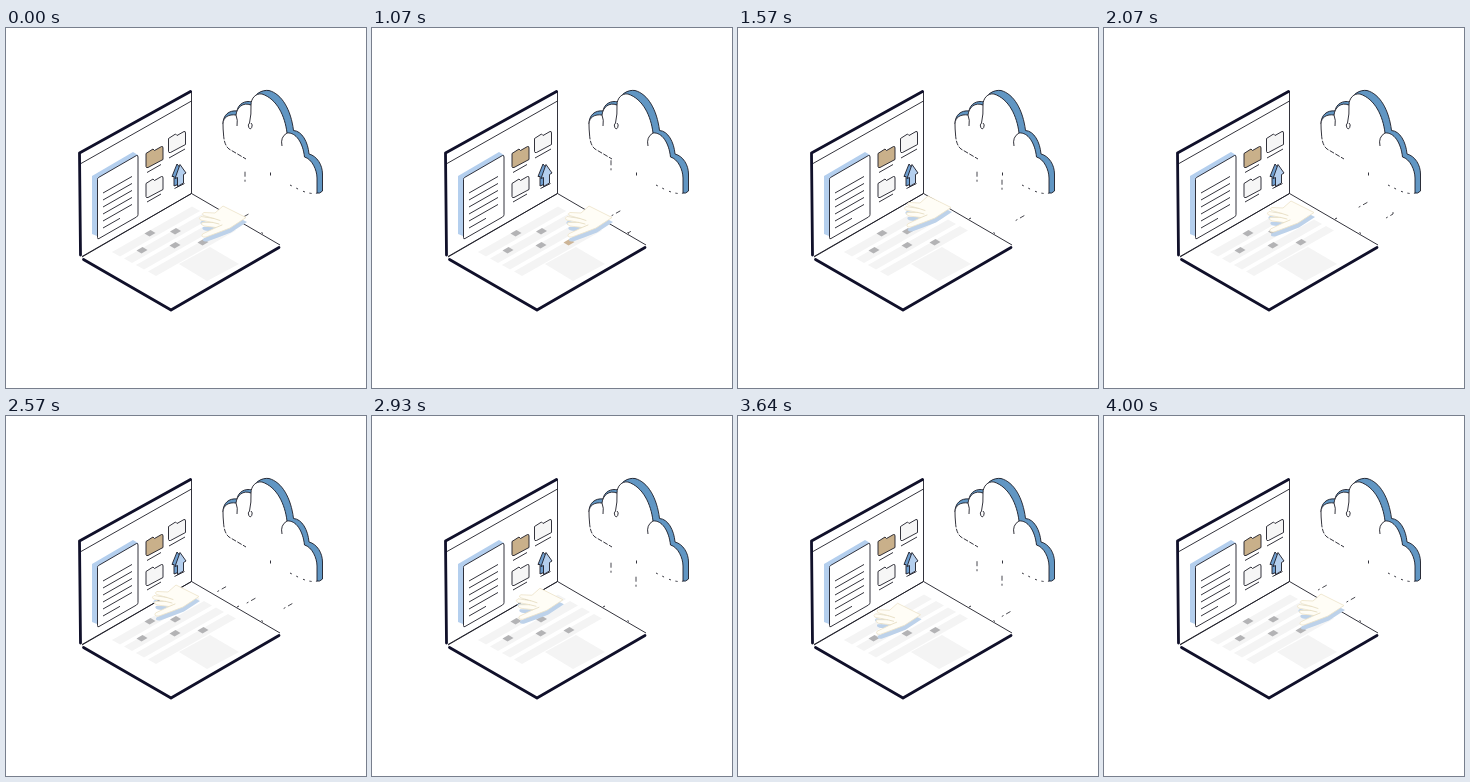
Recreate the animation shown at these times as an HTML page. Size 360x360 px, loop 4280 ms.

```html
<!DOCTYPE html>
<html lang="en">
<head>
<meta charset="utf-8">
<title>Laptop to cloud</title>
<style>
  html, body { margin: 0; width: 100%; height: 100%; overflow: hidden; background: #fff; }
  svg { display: block; width: 100vw; height: 100vh; }
  .line { fill: none; stroke: #1c1c26; stroke-width: .9; stroke-linejoin: round; }
  .edge { fill: none; stroke: #10102a; stroke-width: 2.8; stroke-linejoin: round; stroke-linecap: round; }
  .side { fill: #6196c3; }
  .pale { fill: #f4f4f4; }
  .key { fill: #b3b3b5; }
  .key.down { fill: #cdb597; }
  .packet { fill: none; stroke: #33333a; stroke-width: .9; stroke-dasharray: 2 3 5 70; }
  .skin { fill: #fffdf6; stroke: #ece3c8; stroke-width: .8; stroke-linejoin: round; }
  .crease { fill: none; stroke: #e4dabd; stroke-width: .8; stroke-linecap: round; }
</style>
</head>
<body>
<svg viewBox="0 0 360 360">
  <defs>
    <path id="palm" d="M217 178 L240 189.500 L224 200 L211 205 L200 209 Q194.500 209.500 196.500 206 L210 199.500 L198 198 Q194 196.500 196 194.500 L207 194.500 L194.500 192 Q192 190 195 188.500 L208 190.500 L197.500 187.500 Q195 185.500 198 184.500 L209 185 Z"/>
    <path id="folder" d="M0 6 L7 1.500 L8.500 3 L15.500 -1 Q17 -1.500 17 .5 V12 L2 20 Q0 20.500 0 19 Z"/>
  </defs>

  <!-- screen -->
  <path class="line" d="M75 135.500 L185.500 73 M185.500 63 V165.500 L76 228.500"/>
  <path class="edge" d="M74.500 227 L73.500 125 L184.500 63.500"/>

  <!-- document -->
  <path fill="#b4cfee" d="M86 148 L127 124 L132 127 V182 L91 208 L86 206 Z"/>
  <path class="line" style="fill:#fff" d="M92.500 149.500 L130.500 127.500 Q132 127 132 129 V186.500 Q132 188 130.500 189 L93 210.500 Q91.500 211.500 91.500 209.500 V151.500 Q91.500 150 92.500 149.500 Z"/>
  <path id="text" class="line"/>

  <!-- icons -->
  <g class="line">
    <use href="#folder" x="140" y="119.500" fill="#c9b08a"/>
    <use href="#folder" x="162.500" y="104.500" fill="#f6f6f6"/>
    <use href="#folder" x="140" y="149.500" fill="#f6f6f6"/>
    <path d="M141 144.500 L155 136.500 M163 130 L179 121 M141 174 L155 166 M168.500 160.500 L178.500 155.500"/>
    <path d="M166 148.500 L171 136 L176 142 L173 144 V156 L168 158 V148.500 Z" fill="#6f9fd0"/>
    <path d="M169 150.500 L174 136.500 L180 145 L177.500 146.500 V155 L171.500 158.500 V149.500 Z" fill="#b4cfee"/>
  </g>

  <!-- base -->
  <path class="line" d="M76 229 L185.500 165.500 L274 217"/>
  <path class="edge" d="M77.500 231.500 L165 282 L273 219.500"/>
  <g id="keyboard"></g>
  <path class="pale" d="M173 236 L204 219 L233 236 L201 253 Z"/>

  <!-- cloud -->
  <path class="line side" d="M217 96 C217 87 223 82 231 83 C232 76 239 72 246 74 C248 66 256 61.500 263 62.500 C276 66 285 82 287.500 102.500 C296 103 302 114 303 126 C311 128 316.500 137 316.500 146 V163 Q314 166 310 165 Z"/>
  <path fill="#fff" d="M217 96 C217 89 223 86 230 87 C231 79 237 74 245 77 C245 70 250 65 256 66 C271 71 279 88 281 105 C290 104 297 115 298.500 129 C306 131 311 142 311 150 V165 Q307 167 300 165 L264 146 L239 131 L222 121 Q217 114 217 96 Z"/>
  <path class="line" d="M217.500 106 Q217 101 217 96 C217 89 223 86 230 87 C231 79 237 74 245 77 C245 70 250 65 256 66 C271 71 279 88 281 105 C290 104 297 115 298.500 129 C306 131 311 142 311 150 V165"/>
  <path class="line" d="M230 87 Q232 92 231 98 M245 77 Q245.500 86 243.500 95 M243.500 95 a1.800 3 0 1 0 1.500 0 M281 105 Q274 109 276 118"/>
  <path class="line" stroke-dasharray="5 1.500" d="M217.500 106 Q218 117 223 121 L240 131"/>
  <path class="line" stroke-dasharray="2 5" d="M284 157 L292 161 Q304 167 311 165"/>
  <path class="line" d="M264.500 144.500 v3 M255.500 204.500 l1.500 1 M231 191 l2 -1"/>

  <g id="packets"></g>

  <!-- hand -->
  <use id="shade" href="#palm" fill="#bdd2ea"/>
  <g id="hand">
    <use href="#palm" class="skin"/>
    <path class="crease" d="M207 194.500 L213 196 M208 190.500 L214 192.500 M210 199.500 L216 197"/>
  </g>
</svg>

<script>
const LOOP = 4280, START = 1070, STEP = 2930 / 41;
const $ = id => document.getElementById(id);
const add = (parent, attrs) => {
  const el = document.createElementNS("http://www.w3.org/2000/svg", "path");
  for (const name in attrs) el.setAttribute(name, attrs[name]);
  return parent.appendChild(el);
};

// Text lines on the document; the last is short.
let lines = "";
for (let i = 0; i < 6; i++) {
  const w = i === 5 ? 17 : 29;
  lines += `M97 ${165 + i * 7} l${w} ${-w * .57} `;
}
$("text").setAttribute("d", lines);

// Keyboard rows follow the isometric slope.
for (let i = 0; i < 4; i++) {
  const x = 106 + i * 12, y = 226 + i * 6.5;
  add($("keyboard"), { class: "pale", d: `M${x} ${y - 2} l80 -45.600 l8 4.500 l-80 45.600 Z` });
}

// x, y, first and last step of being pressed
const keys = [[197, 214, 1, 2], [169.5, 203, 11, 12], [144, 205, 23, 24], [136, 222, 33, 34], [169, 217, -1, -1]]
  .map(([x, y, from, to]) => ({
    from, to,
    el: add($("keyboard"), { class: "key", d: `M${x - 5.5} ${y + .5} l6 -3.500 l5 3 l-6 3.500 Z` })
  }));

// Distance travelled by each packet at the marked steps
const marks = [0, 7, 14, 21, 31, 41];
const packets = [
  ["M207 178 L239 160 V131", [43, 123, 230, 325, 395, 488]],
  ["M232 192 L264 174 V146", [2, 49, 106, 170, 230, 332]],
  ["M256 205 L289 186 V160", [68, 105, 190, 265, 348, 470]]
].map(([d, travel]) => ({ travel, el: add($("packets"), { class: "packet", d }) }));

// step, x, y of the hand
const poses = [[0, 0, 0], [2, 0, 0], [7, -27, -10], [10, -30, -5], [14, -30, -5],
  [21, -47, -9], [25, -48, -7], [31, -62, 10], [35, -62, 10], [41, 0, 0]];

const mix = (a, b, p) => a + (b - a) * p;
const segment = (list, k) => {
  let i = 0;
  while (i < list.length - 2 && k >= list[i + 1]) i++;
  return [i, (k - list[i]) / (list[i + 1] - list[i])];
};

function draw(k) {
  const [i, raw] = segment(poses.map(p => p[0]), k);
  const p = raw * raw * (3 - 2 * raw);
  const x = mix(poses[i][1], poses[i + 1][1], p);
  const y = mix(poses[i][2], poses[i + 1][2], p);
  $("hand").setAttribute("transform", `translate(${x} ${y})`);
  $("shade").setAttribute("transform", `translate(${x + 1} ${y + 4.5})`);

  for (const key of keys)
    key.el.classList.toggle("down", k >= key.from && k <= key.to);

  const [j, q] = segment(marks, k);
  for (const { el, travel } of packets)
    el.style.strokeDashoffset = -mix(travel[j], travel[j + 1], q);
}

// The picture advances in even steps after an opening pause.
function tick() {
  const t = performance.now() % LOOP;
  const k = t < START ? 0 : 1 + Math.floor((t - START) / STEP + .05);
  draw(Math.min(41, Math.max(0, k - 1 + (k === 1))));
  requestAnimationFrame(tick);
}
tick();
</script>
</body>
</html>
```
